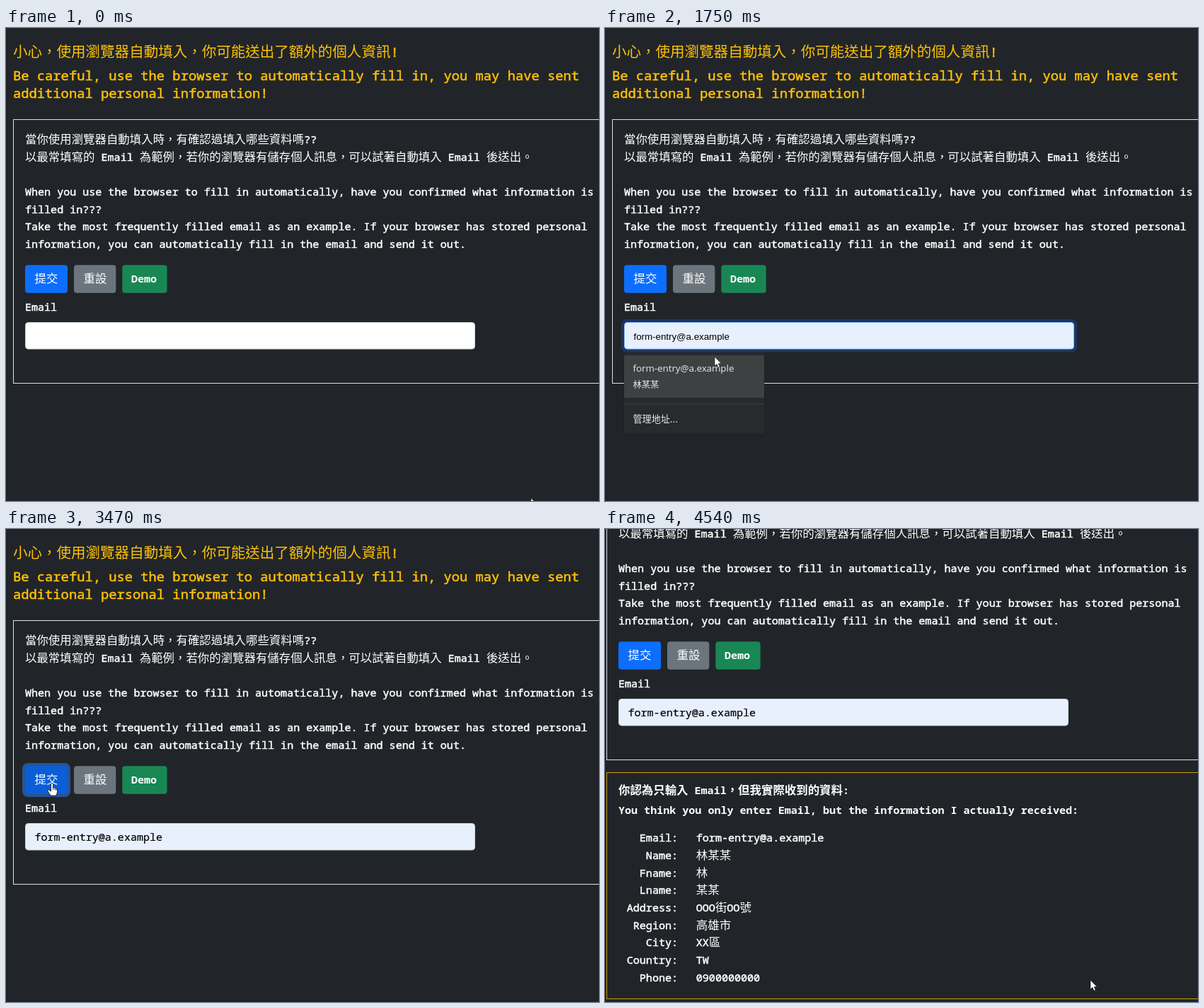
These frames come from a looping animation (838 px wide and 669 px high, 5630 ms). An HTML page:

```html
<!DOCTYPE html>
<html lang="zh-Hant-TW">
<head>
<meta charset="utf-8">
<title>Autofill demo</title>
<style>
html, body { margin: 0; width: 100%; height: 100%; overflow: hidden; background: #212529; }
svg { display: block; width: 838px; height: 669px; }
/* A thin outline gives the Latin text its medium weight. */
text { font: 400 15.05px "Noto Sans Mono", monospace; fill: #fff; stroke: #fff; stroke-width: .5; white-space: pre; }
.zh { font: 400 1.0917em "Noto Sans CJK TC", "Noto Sans CJK", sans-serif; stroke: none; }
.title { font-size: 18.8px; fill: #ffc107; stroke: #ffc107; }
.title .zh { font-weight: 300; }
.bold, .bold .zh { font-weight: 700; stroke: none; }
.end { text-anchor: end; }
.dark { fill: #000; stroke: #000; stroke-width: .2; }
.preview { font: 13.3px "Liberation Sans", Arial, sans-serif; stroke: none; }
.menu { font: 13.3px "Open Sans", "Noto Sans", sans-serif; fill: #e8eaed; stroke: none; }
.small { font: 12.3px "Noto Sans CJK TC", "Noto Sans CJK", sans-serif; fill: #e8eaed; stroke: none; }
.manage { font-size: 13.1px; }
</style>
</head>
<body>
<svg viewBox="0 0 838 669">
  <g id="page">
    <g id="copy"></g>
    <rect x="10.5" y="129.5" width="900" height="373" fill="none" stroke="#dee2e6"/>
    <rect id="ring" fill="#3184fd"/>
    <rect id="submit" x="27" y="335.3" width="60" height="39.4" rx="4"/>
    <rect x="96" y="335.3" width="59.3" height="39.4" rx="4" fill="#6c757d"/>
    <rect x="164.3" y="335.3" width="63.3" height="39.4" rx="4" fill="#198754"/>
    <g id="labels"></g>
    <rect id="glow" fill="#0d6efd"/>
    <rect id="field" x="27.5" y="416.5" width="635" height="37.5" rx="4"/>
    <text id="value" x="40.5" y="440.5"></text>
    <path id="caret" stroke="#000"/>
    <g id="results">
      <rect x="10.5" y="520.5" width="900" height="320" fill="none" stroke="#cc9b0c"/>
    </g>
  </g>
  <g id="menu">
    <rect x="26" y="460" width="200" height="116" rx="5" fill="#000" opacity=".15"/>
    <rect x="27" y="459" width="198" height="115.5" rx="4" fill="#292a2d"/>
    <rect id="item" x="27" y="463" width="198" height="60" fill="#3f4042"/>
    <path d="M27 532H225" stroke="#3f4043"/>
    <text class="menu" id="suggestion" x="39.5" y="486"></text>
    <text class="small" id="person" x="39.5" y="508.5"></text>
    <text class="small manage" x="39.5" y="558">管理地址...</text>
  </g>
  <path id="pointer"/>
</svg>
<script>
const LOOP = 5630, STEP = 1000 / 13;
const EMAIL = 'form-entry@a.example', NAME = '林某某';
const $ = id => document.getElementById(id);
const set = (id, attrs) => {
  for (const name in attrs) $(id).setAttribute(name, attrs[name]);
};
const ramp = (k, from, to) => Math.min(1, Math.max(0, (k - from) / (to - from)));

// Chinese runs get their own font and size.
const line = (text, x, y, cls = '') => `<text class="${cls}" x="${x}" y="${y}">` +
  text.replace(/[^\x00-\x7f]+/g, '<tspan class="zh">$&</tspan>') + '</text>';

const body = [
  '當你使用瀏覽器自動填入時，有確認過填入哪些資料嗎??',
  '以最常填寫的 Email 為範例，若你的瀏覽器有儲存個人訊息，可以試著自動填入 Email 後送出。',
  '',
  'When you use the browser to fill in automatically, have you confirmed what information is',
  'filled in???',
  'Take the most frequently filled email as an example. If your browser has stored personal',
  'information, you can automatically fill in the email and send it out.'
];
$('copy').innerHTML =
  line('小心，使用瀏覽器自動填入，你可能送出了額外的個人資訊!', 10, 41, 'title') +
  line('Be careful, use the browser to automatically fill in, you may have sent', 10, 74.2, 'title') +
  line('additional personal information!', 10, 98.7, 'title') +
  body.map((s, i) => line(s, 27, 163 + 24.65 * i)).join('');
$('labels').innerHTML = line('提交', 40.5, 360.3) + line('重設', 109.5, 360.3) +
  line('Demo', 177, 360.3, 'bold') + line('Email', 27, 400.2);

const received = {
  Email: EMAIL, Name: NAME, Fname: NAME[0], Lname: NAME.slice(1), Address: 'OOO街OO號',
  Region: '高雄市', City: 'XX區', Country: 'TW', Phone: '0900000000'
};
$('results').innerHTML += line('你認為只輸入 Email，但我實際收到的資料:', 27, 551.4, 'bold') +
  line('You think you only enter Email, but the information I actually received:', 27, 579.4, 'bold') +
  Object.entries(received).map(([key, val], i) => {
    const y = 618.4 + 24.65 * i;
    return line(key + ':', 111, y, 'end') + line(val, 136.8, y);
  }).join('');
$('suggestion').textContent = EMAIL;
$('person').textContent = NAME;

// Pointer moves as [step, x, y]; it rests between them.
const moves = [
  [[0, 742, 665], [8, 271, 453], [11, 247.5, 439]],
  [[17, 247.5, 439], [23, 155, 465], [25, 141, 472], [26, 132, 478]],
  [[30, 132, 478], [37, 72, 384], [40, 66, 366], [45, 65, 359]],
  [[48, 65, 359], [56, 541, 580], [59, 686, 638]]
];

// Monotone cubic through the points of one move, at rest at both ends.
function along(points, k, axis) {
  const last = points.length - 1;
  if (k >= points[last][0]) return points[last][axis];
  const i = points.findIndex((p, n) => n < last && k < points[n + 1][0]);
  const slope = n => (points[n + 1][axis] - points[n][axis]) / (points[n + 1][0] - points[n][0]);
  const tangent = n => {
    if (n === 0 || n === last) return 0;
    const a = slope(n - 1), b = slope(n);
    return a * b > 0 ? 2 * a * b / (a + b) : 0;
  };
  const span = points[i + 1][0] - points[i][0], u = (k - points[i][0]) / span, v = 1 - u;
  return points[i][axis] * v * v * (1 + 2 * u) + points[i + 1][axis] * u * u * (3 - 2 * u) +
    span * u * v * (tangent(i) * v - tangent(i + 1) * u);
}

const shapes = {
  arrow: { d: 'M0 0V13L3 10.3 5 15 7.2 14 5.2 9.6H9.2Z', fill: '#fff', stroke: '#000', 'stroke-width': .5 },
  hand: {
    d: 'M-1.5 1.5Q0 -.7 1.5 1.5V7Q3 6 4 7.5 5.5 6.7 6 8 7.5 7.5 7.5 9V13L6 18H-2L-6 11.5Q-6.5 9 -4 10L-1.5 12ZM1.5 7V10M4 7.5V10.5M6 8V11',
    fill: '#fff', stroke: '#111', 'stroke-width': .8
  },
  beam: {
    d: 'M-3 -6.5H-1L0 -5.5 1 -6.5H3M0 -5.5V5.5M-3 6.5H-1L0 5.5 1 6.5H3',
    fill: 'none', stroke: '#222', 'stroke-width': 1
  }
};

// A focus ring that grows around a box.
const halo = (id, x, y, w, h, amount, alpha) => {
  const grow = 4 * amount;
  set(id, {
    x: x - grow, y: y - grow, width: w + 2 * grow, height: h + 2 * grow,
    rx: 4 + grow, opacity: alpha * amount
  });
};

function draw(now) {
  const k = Math.floor((now % LOOP + 20) / STEP);
  const move = moves.filter(m => m[0][0] <= k).pop();
  const x = along(move, k, 1), y = along(move, k, 2);
  const sent = k >= 46, filled = k >= 30;
  const inside = (x0, y0, x1, y1) => !sent && x >= x0 && x <= x1 && y >= y0 && y <= y1;
  const onSubmit = inside(27, 335, 87, 375);
  const shape = onSubmit ? 'hand' : inside(27, 416, 663, 456) ? 'beam' : 'arrow';
  set('pointer', { ...shapes[shape], transform: `translate(${x} ${y})` });

  set('page', { transform: sent ? 'translate(-8 -176)' : '' });
  set('results', { visibility: sent ? 'visible' : 'hidden' });
  set('submit', { fill: onSubmit || k === 46 ? '#0b5ed7' : '#0d6efd' });
  halo('ring', 27, 335, 60, 40, ramp(k, 42, 44) - ramp(k, 45, 47), .5);

  const focus = ramp(k, 13, 15) - ramp(k, 42, 44);
  const open = ramp(k, 14, 16) - ramp(k, 29, 32);
  const hover = open > 0 && y > 460;
  halo('glow', 27, 416, 636, 38.5, focus, .25);
  set('field', {
    fill: hover || filled ? '#e8f0fe' : '#fff',
    stroke: focus > .4 ? '#86b7fe' : '#ced4da'
  });
  set('value', { class: filled ? 'dark' : 'dark preview' });
  $('value').textContent = hover || filled ? EMAIL : '';

  const blink = Math.floor((k - (filled ? 30 : 14)) / 7) % 2 === 0;
  set('caret', {
    d: `M${filled ? 221.5 : 41.5} 426V445`,
    visibility: k >= 14 && k < 43 && blink ? 'visible' : 'hidden'
  });

  set('menu', {
    opacity: open,
    transform: `translate(126 516) scale(${.94 + .06 * open}) translate(-126 -516)`
  });
  set('item', { visibility: hover ? 'visible' : 'hidden' });
  requestAnimationFrame(draw);
}
requestAnimationFrame(draw);
</script>
</body>
</html>
```
